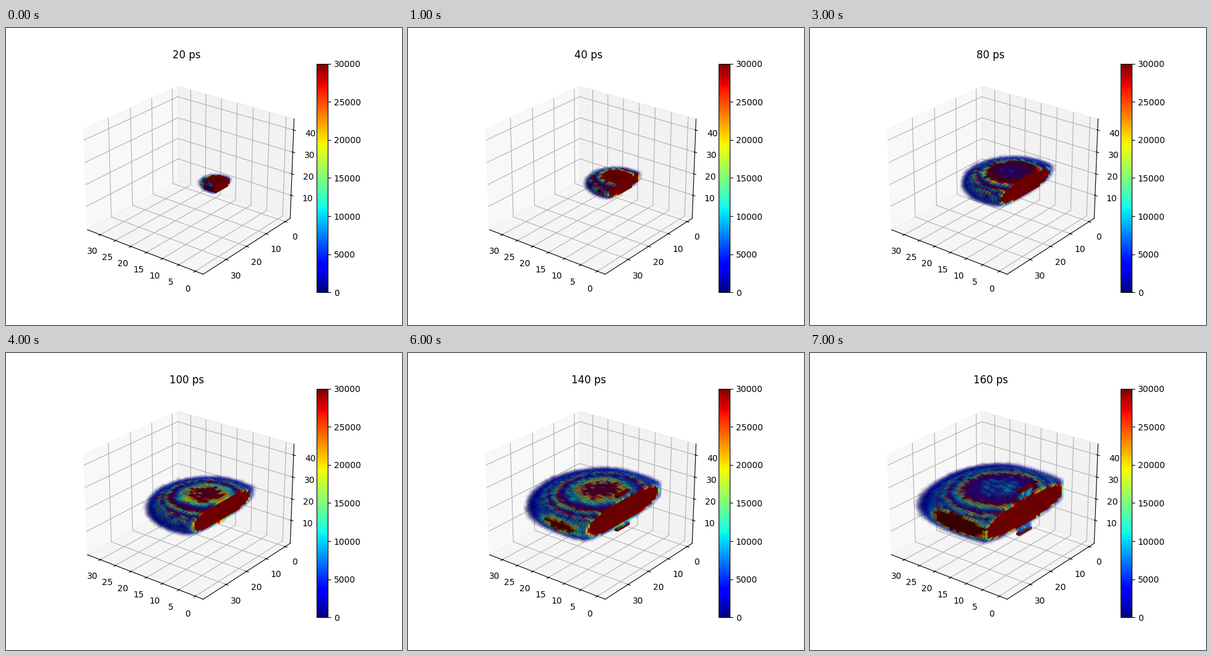
A matplotlib script for the animation above (8000 ms loop, 640x480 px).

```python
import numpy as np
import matplotlib.pyplot as plt
from matplotlib.animation import FuncAnimation
from matplotlib.cm import ScalarMappable
from matplotlib.colors import Normalize
from mpl_toolkits.mplot3d.art3d import Poly3DCollection

VMAX = 30000
STEPS = 8
FALLOFF = 19      # how fast the density drops outside the cloud
BLUNT = 2.5       # above 2 the cloud is flatter than an ellipsoid
X0 = 6            # plane where the cloud starts
CY, CZ = 19, 22   # fixed centre in y and z

# faces of a unit cube turned to the viewer: -x, +y, +z
SQUARE = np.array([(0, 0), (1, 0), (1, 1), (0, 1)])
FACES = np.array([np.insert(SQUARE, axis, side, axis=1)
                  for axis, side in enumerate((0, 1, 1))])
NORMALS = np.array([-1, 1, 1])
LIGHT = np.array([-2, -2, 1]) / 3
SHADES = 0.65 + 0.35 * NORMALS * LIGHT

GRID = np.array(np.meshgrid(np.arange(X0, 32), np.arange(38),
                            np.arange(2, 42), indexing="ij"))
jet = plt.get_cmap("jet")


def density(step):
    x, y, z = GRID + 0.5
    dy, dz = np.abs(y - CY), np.abs(z - CZ)
    grow = (step / (STEPS - 1)) ** 0.8
    center = 7.4 + 0.95 * step
    flat = np.hypot((x - center) / (3.8 + 12 * grow),
                    dy / (4 + 16.8 * grow))
    tall = dz / (1.95 + 4.1 * grow)
    rho = (flat ** BLUNT + tall ** BLUNT) ** (1 / BLUNT)
    rng = np.random.default_rng(step)
    noise = np.exp(0.25 * rng.standard_normal(rho.shape))
    value = VMAX * np.exp(FALLOFF * (1 - rho)) * noise

    # two bars move away along z on the start plane, trailing a thin link
    reach = 2 * step - 4.5
    strip = (x < X0 + 1) & (dy < 3)
    link = strip & (dz < reach)
    value[link] = np.maximum(value, 8000 * noise)[link]
    value[strip & (dz == reach)] = 1.5 * VMAX
    return value


def cubes(step):
    value = density(step)
    alpha = np.clip(value / VMAX, 0, 1) ** 0.6
    solid = np.pad(alpha > 0.9, 1)
    hidden = (solid[:-2, 1:-1, 1:-1] & solid[1:-1, 2:, 1:-1]
              & solid[1:-1, 1:-1, 2:])
    shown = (alpha > 0.06) & ~hidden

    corners = GRID[:, shown].T
    verts = corners[:, None, None, :] + FACES
    rgba = jet(value[shown] / VMAX)
    rgba[:, 3] = alpha[shown]
    colors = np.repeat(rgba[:, None, :], 3, axis=1)
    colors[..., :3] *= SHADES[:, None]
    return Poly3DCollection(verts.reshape(-1, 4, 3).astype(float),
                            facecolors=colors.reshape(-1, 4),
                            edgecolors="none", linewidths=0)


def limits(low, high):
    """Data range plus a 5 % margin and the padding of the box."""
    pad = (high - low) * (0.05 + 1.1 / 48)
    return low - pad, high + pad


fig = plt.figure(figsize=(6.4, 4.8), dpi=100)
ax = fig.add_subplot(projection="3d")
ax.view_init(elev=25, azim=128)
ax.set_xlim(limits(0, 32))
ax.set_ylim(limits(0, 38))
ax.set_zlim(limits(2, 42))
ax.set_xticks(range(0, 31, 5))
ax.set_yticks(range(0, 31, 10))
ax.set_zticks(range(10, 41, 10))
fig.colorbar(ScalarMappable(Normalize(0, VMAX), jet), ax=ax)


def update(step):
    for old in list(ax.collections):
        old.remove()
    ax.add_collection3d(cubes(step))
    ax.set_title(f"{20 * (step + 1)} ps")


anim = FuncAnimation(fig, update, frames=STEPS, interval=1000, repeat=True)
plt.show()
```
